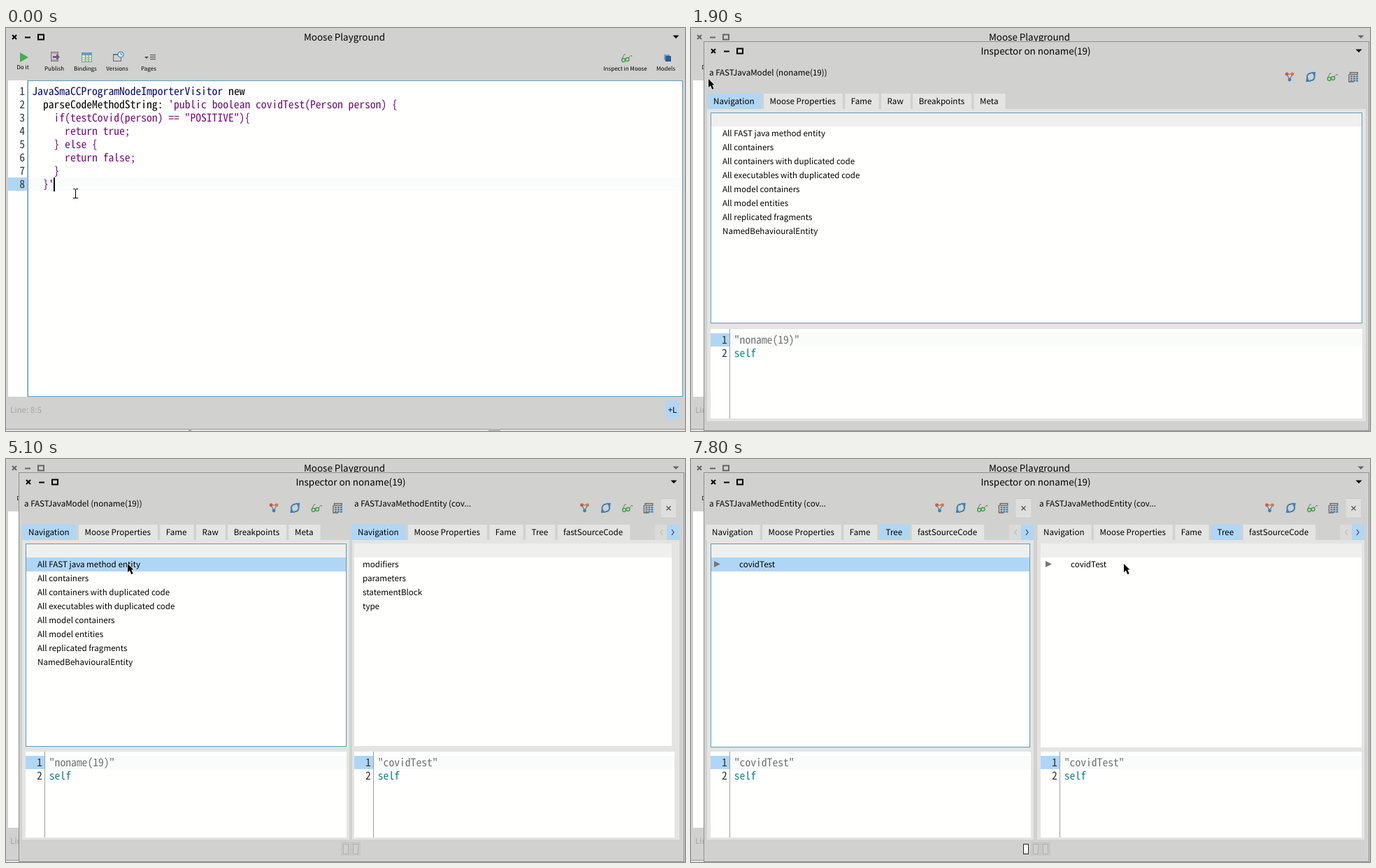
Write an HTML page with a canvas that moves like this. It is 971 px wide and 577 px high and loops after 8000 ms.

```html
<!DOCTYPE html>
<html lang="en">
<head>
<meta charset="utf-8">
<title>Moose Playground</title>
<style>
html, body { margin: 0; width: 100%; height: 100%; overflow: hidden; background: #d1d1cf; }
canvas { display: block; }
</style>
</head>
<body>
<canvas id="stage" width="971" height="577"></canvas>
<script>
const ctx = document.getElementById('stage').getContext('2d');
const LOOP = 8000, STEP = 100;
const GREY = '#d1d1cf', PANEL = '#e4e4e2', WHITE = '#fffffe', BLUE = '#b0d6f5', EDGE = '#5f9dbb';
const PURPLE = '#750b78', NAVY = '#0a0a70', TEAL = '#178086', STEEL = '#3f82b5', DIM = '#666664';

ctx.textRendering = 'geometricPrecision';
const UI = '"Noto Sans CJK JP", "Noto Sans CJK SC", "Noto Sans CJK", "Noto Sans", sans-serif';
const MONO = '"Noto Sans Mono CJK JP", "Noto Sans Mono CJK SC", "Noto Sans Mono", monospace';
const CHAR = 7.8;
ctx.font = '100px ' + MONO;
const codeFont = 100 * CHAR / ctx.measureText('0').width + 'px ' + MONO;
const uiFont = size => size * 0.894 + 'px ' + UI;

// --- primitives ---
function box(x, y, r, b, fill) {
  ctx.fillStyle = fill;
  ctx.fillRect(x, y, r - x, b - y);
}
function frame(x, y, r, b, color, w = 1) {
  ctx.strokeStyle = color;
  ctx.lineWidth = w;
  ctx.strokeRect(x + w / 2, y + w / 2, r - x - w, b - y - w);
}
function path(points, color, w) {
  ctx.beginPath();
  points.forEach(([x, y]) => ctx.lineTo(x, y));
  if (w) {
    ctx.strokeStyle = color;
    ctx.lineWidth = w;
    ctx.stroke();
  } else {
    ctx.fillStyle = color;
    ctx.fill();
  }
}
function arc(x, y, r, color, w, from = 0, to = 2 * Math.PI) {
  ctx.beginPath();
  ctx.arc(x, y, r, from, to);
  ctx.strokeStyle = ctx.fillStyle = color;
  ctx.lineWidth = w;
  if (w) ctx.stroke(); else ctx.fill();
}
function text(s, x, y, color = '#000', size = 13, align = 'left') {
  ctx.font = uiFont(size);
  ctx.textAlign = align;
  ctx.fillStyle = color;
  ctx.fillText(s, x, y);
}
function code(s, x, y, color) {
  ctx.font = codeFont;
  ctx.textAlign = 'left';
  ctx.fillStyle = color;
  ctx.fillText(s, x, y);
}
function cross(x, y, r, color, w) {
  path([[x - r, y - r], [x + r, y + r]], color, w);
  path([[x - r, y + r], [x + r, y - r]], color, w);
}
const at = (x, y, draw) => { ctx.save(); ctx.translate(x, y); draw(); ctx.restore(); };

// --- icons, drawn around their centre ---
function glasses() {
  arc(-4, 3, 2.4, '#3fa648', 1.5);
  arc(1.5, 2, 2.4, '#3fa648', 1.5);
  path([[-6, 1], [-3, -5], [-1, -5]], '#777', 1);
  path([[3, 0], [7, -4], [8, -2]], '#777', 1);
}
function nodes() {
  path([[-4, -4], [0, 4], [4, -4], [-4, -4]], '#777', 1.2);
  arc(-4, -4, 2.4, '#d4573f');
  arc(4, -4, 2.4, '#d4784c');
  arc(0, 4, 2.4, STEEL);
}
function refresh() {
  arc(0, 0, 5.3, STEEL, 2, 2.5, 4.9);
  arc(0, 0, 5.3, STEEL, 2, -0.6, 1.8);
  path([[0, -7], [7, -7], [6, -1]], STEEL);
  path([[0, 7], [-7, 7], [-6, 1]], STEEL);
}
function table() {
  frame(-5, -7, 7, -3, '#666', 1.3);
  path([[-6, -4], [-6, 7], [1, 7]], '#666', 1.3);
  for (let i = 0; i < 9; i++) {
    const x = -4 + i % 3 * 4, y = -2 + (i / 3 | 0) * 3.2;
    box(x, y, x + 3, y + 2.3, i % 3 + i / 3 > 2 ? STEEL : '#777');
  }
}
function publish() {
  frame(-6, -7, 5, 7, '#777', 1.3);
  box(-4, -5, 3, -4, '#999');
  box(-4, 4, 3, 5, '#999');
  box(-3, -1, 3, 2, '#7a5290');
  path([[2, -4], [7, .5], [2, 5]], '#7a5290');
}
function bindings() {
  box(-7, -7, 8, 7, '#6c98b9');
  box(-6, -3, -2, 6, '#d9e7ef');
  box(-1, -3, 3, 6, '#ecd68f');
  box(4, -3, 7, 6, '#d9e7ef');
  for (let y = 0; y < 6; y += 3) box(-6, y, 7, y + .7, '#8da9b9');
}
function versions() {
  frame(-7, -4, 5, 7, '#777', 1.2);
  box(-7, -4, 5, -2, '#777');
  arc(4, -3, 4, '#dcebf5');
  arc(4, -3, 4, STEEL, 1.2);
  path([[4, -5.5], [4, -3], [6, -3]], STEEL, 1);
}
function pages() {
  path([[-7, -1], [-1, -1], [-4, 2]], '#444');
  for (let y = -4; y < 5; y += 3) box(1, y, 9, y + 1.2, '#555');
}
function models() {
  box(-5, -5, 3, 3, '#7f9fba');
  box(-3, -3, 5, 5, '#285f96');
}

// --- windows ---
function titleBar(x, y, right, title, mid, color) {
  cross(x, y + .5, 3, color, 2);
  box(x + 15, y, x + 23, y + 2, color);
  frame(x + 33, y - 4, x + 43, y + 5, color, 2);
  path([[right - 4.5, y - 2], [right + 4.5, y - 2], [right, y + 2.5]], color);
  text(title, mid, y + 5, '#000', 15, 'center');
}

const source = [
  '', '', '    if(testCovid(person) == "POSITIVE"){', '      return true;',
  '    } else {', '      return false;', '    }', "  }'"
];
const tools = [
  ['Publish', 69, 70, 41, publish], ['Bindings', 113.5, 115, 42, bindings],
  ['Versions', 159, 160, 41, versions], ['Pages', 204, 205, 42, pages],
  ['Inspect in Moose', 885.5, 887, 43, glasses], ['Models', 943.5, 946, 43, models]
];

function playground(t) {
  box(0, 0, 971, 577, GREY);
  titleBar(12, 12.5, 958, 'Moose Playground', 484, t < 1800 ? '#000' : DIM);
  path([[20, 35], [32, 42], [20, 49]], '#45ad50');
  text('Do it', 24, 59, '#000', 9, 'center');
  for (const [label, x, iconX, iconY, icon] of tools) {
    at(iconX, iconY, icon);
    text(label, x, 61, '#000', 9, 'center');
  }
  box(3, 75, 31, 528, WHITE);
  box(31, 75, 968, 528, WHITE);
  const selected = t >= 700;
  if (selected) {
    box(36, 81, 962, 214, '#b0d5f3');
    box(36, 214, 68, 233, '#b0d5f3');
  } else {
    box(3, 214, 31, 233, BLUE);
    box(32, 214, 967, 233, '#fafcfc');
  }
  frame(31, 75, 968, 528, EDGE);
  box(30, 75, 31, 528, '#a9c5d0');
  source.forEach((line, i) => {
    code(i + 1, 19.3, 96 + 19 * i, '#333');
    code(line, 37.3, 96 + 19 * i, PURPLE);
  });
  code('JavaSmaCCProgramNodeImporterVisitor', 37.3, 96, NAVY);
  code('new', 37.3 + 36 * CHAR, 96, '#000');
  code('parseCodeMethodString:', 37.3 + 2 * CHAR, 115, '#000');
  code("'public boolean covidTest(Person person) {", 37.3 + 25 * CHAR, 115, PURPLE);
  if (t < 100 || t >= 600) box(68, 214, 70, 234, '#000');
  text(t < 1100 ? 'Line: 8:5' : 'Line: 1:1', 6, 551, '#a5a5a3');
  box(943, 534, 963, 559, BLUE);
  text('+L', 953, 551, '#000', 13, 'center');
  box(0, 574, 971, 575, '#989896');
  box(0, 575, 971, 577, '#e6e6e4');
  box(261, 574, 265, 577, '#aaaaa8');
  box(690, 574, 707, 577, '#b5b5b3');
}

const modelTabs = ['Navigation', 'Moose Properties', 'Fame', 'Raw', 'Breakpoints', 'Meta'];
const methodTabs = ['Navigation', 'Moose Properties', 'Fame', 'Tree', 'fastSourceCode'];
const modelRows = ['All FAST java method entity', 'All containers', 'All containers with duplicated code',
  'All executables with duplicated code', 'All model containers', 'All model entities',
  'All replicated fragments', 'NamedBehaviouralEntity'];
const methodRows = ['modifiers', 'parameters', 'statementBlock', 'type'];

const model = { head: 'a FASTJavaModel (noname(19))', comment: '"noname(19)"', tabs: modelTabs,
  tab: 0, rows: modelRows, x: 23, left: 28, tabX: 23.5, indent: 17, focus: true };
const method = { head: 'a FASTJavaMethodEntity (cov...', comment: '"covidTest"', tabs: methodTabs,
  tab: 0, rows: methodRows, close: true };
const tree = { ...method, tab: 3, rows: ['covidTest'], tree: true };
const split = { bottom: 545, listEnd: 411, codeTop: 419, codeEnd: 542 };

function pane(p) {
  text(p.head, p.x + 3, 68);
  [nodes, refresh, glasses, table].forEach((icon, i) => at(p.icons + 30.3 * i, 70, icon));
  if (p.close) {
    const x = p.icons + 120;
    box(x - 12, 56, x + 12, 85, '#dededc');
    frame(x - 12, 56, x + 12, 85, '#cacac8');
    cross(x, 70.5, 3, '#555', 1.3);
  }
  box(p.x, 116, p.right, p.bottom, PANEL);
  let x = p.tabX;
  p.tabs.forEach((label, i) => {
    ctx.font = uiFont(13);
    const w = ctx.measureText(label).width;
    box(x, 94, x + w + 18.5, 116, i === p.tab ? BLUE : PANEL);
    text(label, x + 8.5, 109);
    x += w + 22;
  });
  if (p.close) {
    box(p.right - 35, 94, p.right - 18, 116, '#dadad8');
    box(p.right - 18, 94, p.right, 116, BLUE);
    path([[p.right - 24, 101], [p.right - 27, 105], [p.right - 24, 109]], '#bdbdbb', 1.2);
    path([[p.right - 11, 101], [p.right - 8, 105], [p.right - 11, 109]], '#345', 1.2);
  }

  box(p.left, 121, p.listRight, p.listEnd, WHITE);
  box(p.left, 121, p.listRight, 141, '#efefed');
  if (p.picked) box(p.left, 141, p.listRight, 161, BLUE);
  if (p.focus) frame(p.left, 121, p.listRight, p.listEnd + 1, EDGE);
  p.rows.forEach((row, i) => text(row, p.left + p.indent, 155 + 20 * i));
  if (p.tree) {
    const a = p.left + p.indent - 36;
    path([[a, 146], [a + 9, 150.5], [a, 155]], '#777');
  }

  const y = p.codeTop + 6;
  box(p.left, p.codeTop, p.codeRight, p.codeEnd, WHITE);
  box(p.left, y, p.left + 27, y + 19, BLUE);
  box(p.left + 28, y, p.codeRight, y + 19, '#fafcfc');
  box(p.left + 27, p.codeTop, p.left + 28, p.codeEnd, '#a0a09e');
  code(1, p.left + 16, y + 15, '#333');
  code(2, p.left + 16, y + 34, '#333');
  code(p.comment, p.left + 33.8, y + 15, '#6f7572');
  code('self', p.left + 33.8, y + 34, TEAL);
}

function pager(x, first) {
  if (first) {
    box(x - 4, 551, x + 4, 566, WHITE);
    frame(x - 4, 551, x + 4, 566, '#222');
    x += 14;
  }
  box(x - 7, 548, x + 21, 568, '#c8c8c6');
  for (const c of [x, x + 14]) {
    box(c - 4, 551, c + 4, 566, '#d0d0ce');
    frame(c - 4, 551, c + 4, 566, '#b2b2b0');
  }
}

function inspector(t) {
  box(18, 19, 971, 577, GREY);
  frame(18, 19, 970, 577, '#8f8f8d');
  titleBar(32, 32.5, 955, 'Inspector on noname(19)', 493, '#000');
  if (t < 5100) {
    pane({ ...model, picked: t >= 4600, right: 965, bottom: 563, icons: 856, listRight: 960,
      listEnd: 422, codeTop: 431, codeRight: 960, codeEnd: 559 });
    return;
  }
  const side = { ...split, x: 495, right: 963, icons: 827.5 };
  if (t < 7800) {
    const k = Math.min(1, Math.max(0, (t - 5300) / 400));
    pane({ ...model, ...split, picked: true, right: 491, icons: 383, listRight: 487, codeRight: 487 });
    pane({ ...(t < 7000 ? method : tree), ...side, picked: t >= 7600, tabX: 494.5 + k / 2, left: 498 + k,
      indent: t < 7000 ? 12 + 3 * k : 43, listRight: 952 + 4 * k, codeRight: 956 + 2 * k });
    pager(486);
  } else {
    pane({ ...tree, ...split, picked: true, focus: true, x: 23, right: 490, icons: 355.5, tabX: 21.5,
      left: 28, indent: 41, listRight: 485, listEnd: 412, codeRight: 486 });
    pane({ ...tree, ...side, tabX: 495.5, left: 500, indent: 43, listRight: 959, listEnd: 413, codeRight: 959 });
    pager(479, true);
  }
}

// --- pointer: [time, x, y] ---
const route = [
  [500, 99, 237], [600, 92, 220], [700, 55, 140], [800, 30, 88], [900, 28, 75], [1000, 28, 75],
  [1100, 24, 75], [1200, 25, 73], [2700, 25, 73], [2800, 27, 67], [3000, 90, 85], [3200, 198, 115],
  [3300, 213, 111], [3500, 213, 111], [3600, 219, 106], [3700, 219, 106], [3800, 217, 112],
  [4100, 195, 160], [4300, 180, 165], [4600, 174, 150], [5300, 174, 150], [5400, 190, 145],
  [5700, 440, 190], [5800, 440, 190], [5900, 500, 178], [6100, 683, 136], [6300, 735, 120],
  [6700, 754, 105], [6800, 767, 102], [7100, 767, 102], [7200, 750, 115], [7400, 660, 150], [7600, 619, 150]
];
function pointer(t) {
  const next = route.findIndex(p => p[0] > t);
  const b = next < 0 ? route[route.length - 1] : route[next];
  const a = next > 0 ? route[next - 1] : b;
  const k = a === b ? 0 : (t - a[0]) / (b[0] - a[0]);
  at(a[1] + (b[1] - a[1]) * k, a[2] + (b[2] - a[2]) * k, t < 1200 ? beam : arrow);
}
function beam() {
  box(0, -6, 1, 7, '#000');
  for (const y of [-7, 6]) {
    box(-3, y, 0, y + 1, '#000');
    box(1, y, 4, y + 1, '#000');
  }
}
function arrow() {
  const shape = [[0, 0], [0, 12], [3, 9.5], [5.3, 15], [7.6, 14], [5.2, 8.6], [8.5, 8.6], [0, 0]];
  path(shape, '#f4f4f2', 1.5);
  path(shape, '#000');
}

function draw(now) {
  const t = Math.floor(now % LOOP / STEP) * STEP;
  playground(t);
  if (t >= 1800) inspector(t);
  pointer(t);
  requestAnimationFrame(draw);
}
requestAnimationFrame(draw);
</script>
</body>
</html>
```
